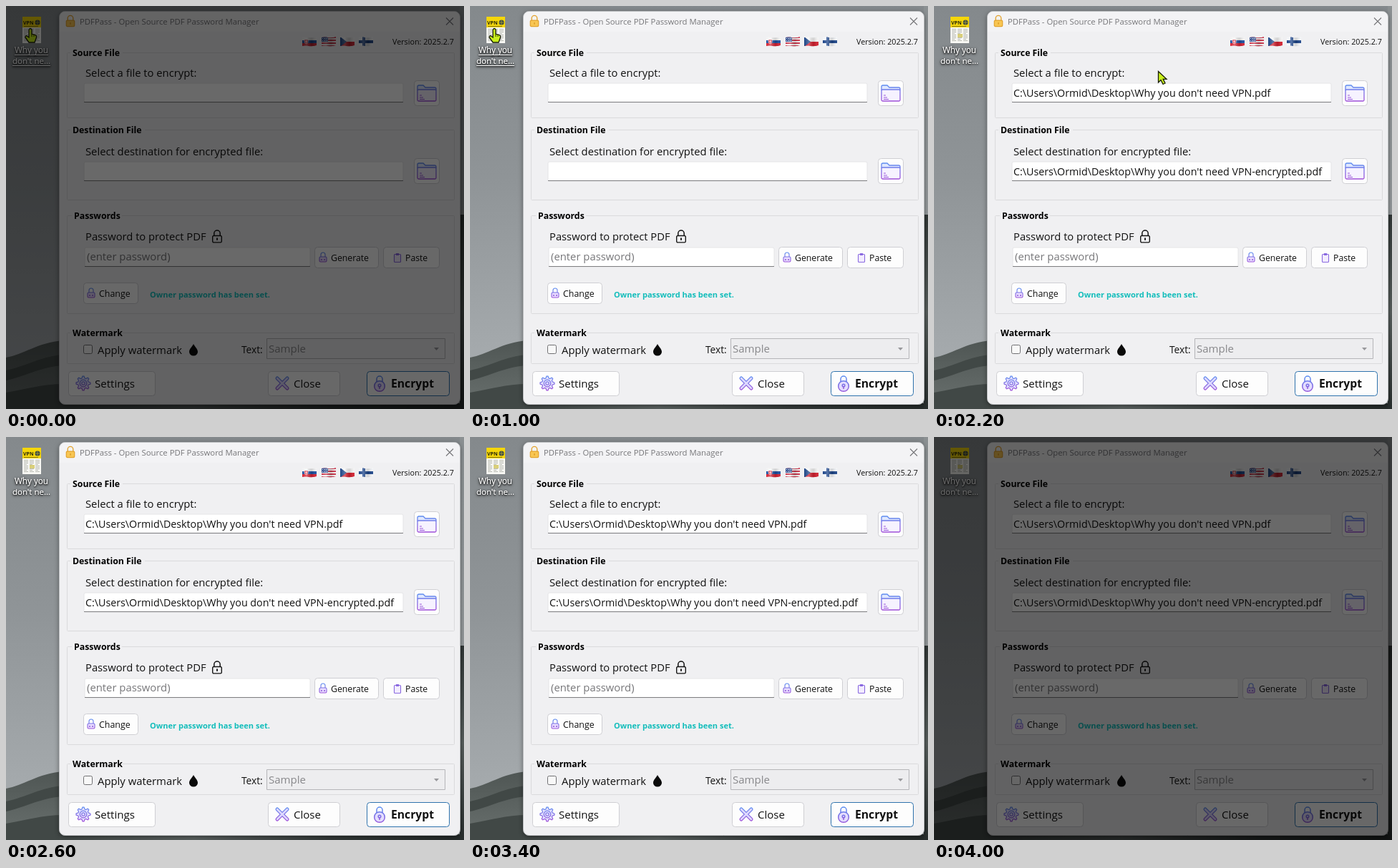
Animation, 640 px wide and 564 px high, one loop 4200 ms. Source, as an HTML page with a canvas:

```html
<!DOCTYPE html>
<html lang="en">
<head>
<meta charset="utf-8">
<title>PDF password dialog</title>
<style>
html, body { margin: 0; width: 100%; height: 100%; overflow: hidden; background: #000; }
canvas { display: block; }
</style>
</head>
<body>
<canvas id="stage" width="640" height="564"></canvas>
<script>
const c = document.getElementById('stage').getContext('2d');
const LOOP = 4200, STEP = 200;
const FONT = '"Open Sans", "Noto Sans", sans-serif';
const SOURCE = "C:\\Users\\Ormid\\Desktop\\Why you don't need VPN.pdf";
const TARGET = SOURCE.replace('.pdf', '-encrypted.pdf');

function text(s, x, y, size, color = '#111', weight = 400, align = 'left') {
  c.font = `${weight} ${size}px ${FONT}`;
  c.textAlign = align;
  c.fillStyle = color;
  c.fillText(s, x, y);
}

function rect(x, y, w, h, color) {
  c.fillStyle = color;
  c.fillRect(x, y, w, h);
}

function box(x, y, w, h, r, fill, stroke, line = 1) {
  c.beginPath();
  c.roundRect(x, y, w, h, r);
  if (fill) { c.fillStyle = fill; c.fill(); }
  if (stroke) { c.strokeStyle = stroke; c.lineWidth = line; c.stroke(); }
}

function path(d, fill, stroke, line = 1) {
  const p = new Path2D(d);
  if (fill) { c.fillStyle = fill; c.fill(p); }
  if (stroke) { c.strokeStyle = stroke; c.lineWidth = line; c.stroke(p); }
}

function fade(x0, y0, x1, y1, ...colors) {
  const g = c.createLinearGradient(x0, y0, x1, y1);
  colors.forEach((k, i) => g.addColorStop(i / (colors.length - 1), k));
  return g;
}

function at(x, y, draw) {
  c.save();
  c.translate(x, y);
  draw();
  c.restore();
}

function desktop() {
  rect(0, 0, 640, 564, fade(0, 0, 0, 480, '#84898c', '#8f9497', '#a4a9ac'));
  path('M0 492C24 488 44 471 80 468V564H0Z', fade(0, 468, 0, 564, '#4f5654', '#5c6361', '#6a716f'));
  path('M0 510C28 504 50 490 80 488V503C48 505 22 520 0 524Z', '#414846');
  path('M0 541C30 536 50 529 80 529V564H0Z', '#414846');
  rect(74, 556, 566, 8, fade(74, 0, 640, 0, '#424947', '#5b6261', '#343a39', '#252b2a'));
  rect(634, 0, 6, 292, fade(0, 0, 0, 292, '#8b9092', '#94999b'));
  rect(634, 292, 6, 272, fade(0, 292, 0, 564, '#303635', '#565d5b', '#272d2c'));
}

function pdfIcon(hover) {
  rect(23, 15, 26, 37, '#f8f8f4');
  rect(23, 15, 26, 15, '#f5d60a');
  text('VPN', 24, 26, 7, '#28280c', 700);
  c.beginPath();
  c.arc(44, 23, 3.6, 0, 7);
  c.fillStyle = '#3d4a45';
  c.fill();
  path('M40 23H48M44 19V27', null, '#b5a92c', .7);
  rect(25, 28, 20, 1, '#88780c');
  for (let i = 0; i < 9; i++)
    for (let k = 0; k < 3; k++) rect(25 + k * 8, 32 + i * 2, i % 4 === 3 ? 4 : 6, 1, '#b9bbb4');
  rect(33, 39, 7, 5, '#d9cf7a');
  c.save();
  c.shadowColor = '#000';
  c.shadowOffsetY = 1;
  for (const blur of [4, 2]) {
    c.shadowBlur = blur;
    text('Why you', 35.5, 66, 11.7, '#fff', 400, 'center');
    text("don't ne...", 35.5, 81, 11.5, '#fff', 400, 'center');
    if (hover) { rect(12, 68, 47, 1, '#fff'); rect(9, 83, 53, 1, '#fff'); }
  }
  c.restore();
}

function padlock(x, y, s, stroke, fill) {
  at(x, y, () => {
    c.scale(s, s);
    path('M-4 -1V-4A4 4 0 0 1 4 -4V-1', null, stroke, 1.4);
    box(-6, -1, 12, 9, 1.5, fill, stroke, 1.3);
    path('M0 2V5', null, stroke, 1.8);
  });
}

function flag(x, draw) {
  at(x, 43, () => {
    c.beginPath();
    c.moveTo(0, 1);
    c.bezierCurveTo(6, -1, 12, 3, 20, 0);
    c.lineTo(20, 12);
    c.bezierCurveTo(12, 15, 6, 11, 0, 13);
    c.closePath();
    c.clip();
    draw();
    rect(0, 0, 20, 14, fade(0, 0, 20, 0, '#fff0', '#fff4', '#0002', '#fff1'));
  });
}

function flags() {
  flag(414, () => {
    rect(0, 0, 20, 5, '#f4f4f4'); rect(0, 5, 20, 4, '#1d4fa0'); rect(0, 9, 20, 5, '#d52232');
    path('M3 4H8V7Q8 9 5.5 10Q3 9 3 7Z', '#d52232', '#fff', .6);
    path('M5.5 5V9M4.3 6.5H6.7', null, '#fff', .8);
  });
  flag(441, () => {
    for (let i = 0; i < 7; i++) rect(0, i * 2, 20, 2, i % 2 ? '#f4eeee' : '#c9344a');
    rect(0, 0, 9, 7, '#34508f');
    for (let i = 0; i < 6; i++) rect(1 + i % 3 * 3, 2 + (i / 3 | 0) * 3, 1, 1, '#dfe5f2');
  });
  flag(467, () => {
    rect(0, 0, 20, 7, '#f5f5f5'); rect(0, 7, 20, 7, '#d3202f');
    path('M0 0L9 7L0 14Z', '#1d4586');
  });
  flag(493, () => {
    rect(0, 0, 20, 14, '#f4f6f9'); rect(5, 0, 4, 14, '#1c4489'); rect(0, 5, 20, 4, '#1c4489');
  });
}

function group(y, h, title, w, x = 93) {
  box(85.5, y + .5, 541, h, 1, null, '#dadadc');
  rect(x - 3, y - 3, w + 6, 7, '#f0f0f2');
  text(title, x, y + 4.5, 12.3, '#000', 700);
}

function field(x, y, w, value) {
  box(x, y, w, 27, 2, '#fff', '#e4e4e6');
  rect(x, y + 26, w, 1, '#7f7f82');
  if (value) text(value, x + 2, y + 19, 14.28, '#111');
}

function button(x, y, w, h, label, tx, size, weight, edge = '#cfcfd3') {
  box(x + .5, y + .5, w - 1, h - 1, 4, '#fdfdfd', edge);
  if (label) text(label, tx, y + h / 2 + size * .37, size, '#111', weight);
}

const violet = (h) => fade(0, -h, 0, h, '#5d8df0', '#a04fd8');

function browse(y) {
  button(570, y, 36, 36);
  at(588, y + 18, () => {
    path('M-13 -4V-9Q-13 -11 -11 -11H-5L-2 -8H11Q13 -8 13 -6V-4', '#dfe8ff', violet(11), 1.3);
    box(-13, -5, 26, 16, 1.5, '#f6f2ff', violet(11), 1.3);
    path('M-10 3H-7M-10 6H-5M-10 8.5H-3', null, '#9a58da', 1);
  });
}

function keyIcon(x, y) {
  at(x, y, () => {
    path('M-3 -1V-4A3 3 0 0 1 3 -4V-1', null, violet(7), 1.1);
    box(-5, -1, 10, 7, 1.5, '#e8dcff', violet(7), 1.1);
    path('M-3 3H-1M1 3H3', null, '#8d55d7', 1.3);
  });
}

function gear() {
  at(108, 528, () => {
    c.strokeStyle = violet(10);
    c.lineWidth = 1.2;
    c.beginPath();
    for (let i = 0; i <= 32; i++) {
      const r = i % 4 < 2 ? 10 : 7.3, a = (i - .5) * Math.PI / 16;
      c.lineTo(Math.cos(a) * r, Math.sin(a) * r);
    }
    c.fillStyle = '#e4e2ff';
    c.fill();
    c.stroke();
    for (const r of [4.8, 2.2]) { c.beginPath(); c.arc(0, 0, r, 0, 7); c.stroke(); }
  });
}

function dialog(filled) {
  c.save();
  c.shadowColor = '#0007';
  c.shadowBlur = 7;
  c.shadowOffsetY = 2;
  box(74.5, 7.5, 560, 550, 8, '#f0f0f2');
  c.restore();
  box(74.5, 7.5, 560, 550, 8, null, '#c2c4c6');
  box(75, 8, 559, 28, [8, 8, 0, 0], '#f3f3f5');
  padlock(90, 21, .95, '#e2a22c', '#f8c653');
  text('PDFPass - Open Source PDF Password Manager', 103, 26, 11.35, '#77777a');
  path('M615 16.5L625 26.5M625 16.5L615 26.5', null, '#77777a', 1.1);
  flags();
  text('Version: 2025.2.7', 540, 54, 10.75);

  group(65, 91, 'Source File', 67);
  text('Select a file to encrypt:', 111, 99, 14.8);
  field(109, 108, 446, filled && SOURCE);
  browse(104);

  group(173, 98, 'Destination File', 98);
  text('Select destination for encrypted file:', 111, 209, 14.8);
  field(109, 218, 446, filled && TARGET);
  browse(213);

  group(293, 137, 'Passwords', 64, 95);
  text('Password to protect PDF', 111, 328, 14.75);
  padlock(295, 322.5, 1.05, '#111');
  field(110, 338, 315);
  text('(enter password)', 113, 356, 14.85, '#77777a');
  button(431, 337, 90, 30, 'Generate', 454, 12.25);
  keyIcon(443, 352);
  button(527, 337, 79, 30, 'Paste', 558, 12.25);
  box(542.5, 347.5, 9, 11, 1, '#f3edff', '#8a6ae0', 1.1);
  rect(545, 346, 4, 3, '#8a6ae0');
  button(108, 387, 77, 30, 'Change', 130, 12.4);
  keyIcon(119, 402);
  text('Owner password has been set.', 201, 408, 11.05, '#13bdbb', 700);

  group(457, 43, 'Watermark', 67);
  box(108.5, 474.5, 12, 12, 2, '#f8f8f8', '#707072');
  text('Apply watermark', 128, 487, 14.85);
  path('M262 473C264 477 268 480 268 484A6 5.5 0 0 1 256 484C256 480 260 477 262 473Z', '#0a0a0a');
  text('Text:', 329, 486, 13.7);
  box(364.5, 465.5, 249, 28, 0, '#ededef', '#b5b5b8');
  text('Sample', 367, 485, 15, '#88888b');
  path('M598 478H605L601.5 482Z', '#98989b');

  button(87, 511, 122, 35, 'Settings', 124, 15.1);
  gear();
  button(366, 511, 101, 35, 'Close', 402, 15);
  at(386, 528, () => {
    c.lineCap = 'round';
    path('M-7 -7L7 7M7 -7L-7 7', null, violet(9), 5);
    path('M-7 -7L7 7M7 -7L-7 7', null, '#ddd9ff', 2.6);
  });
  button(504, 511, 116, 35, 'Encrypt', 538, 15.7, 700, '#2f73ad');
  at(522, 531, () => {
    path('M-4 -5V-9A4 4 0 0 1 4 -9V-5', null, violet(12), 1.5);
    c.beginPath();
    c.arc(0, 1, 7.3, 0, 7);
    c.fillStyle = '#e4ddff';
    c.fill();
    c.stroke();
    c.beginPath();
    c.arc(0, 0, 1.8, 0, 7);
    c.stroke();
    path('M0 2V5', null, '#8d55d7', 1.4);
  });
}

const ARROW = 'M.5 .5V16L4 12.5L7 18.5L10 17L7.2 11.3H12Z';

const cursors = {
  hand() {
    path('M-2 8V1Q0 -2 2 1V7L7 8.5Q9 9.5 8.5 12L6 19H-2L-7 12Q-7 9 -4.5 10L-2 12Z', '#c9f01c', '#161a06', 1.3);
    path('M2 7V11M5 8V11', null, '#161a06', .9);
  },
  deny() {
    for (const [color, w] of [['#fff', 5], ['#111', 2.8]]) {
      c.strokeStyle = color;
      c.lineWidth = w;
      c.beginPath();
      c.arc(0, 0, 9, 0, 7);
      c.moveTo(-6.4, -6.4);
      c.lineTo(6.4, 6.4);
      c.stroke();
    }
  },
  drag() {
    path(ARROW, '#fff', '#111', 1.1);
    c.setLineDash([1.5, 1.5]);
    box(4.5, 15.5, 9, 9, 0, null, '#222');
    c.setLineDash([]);
    box(9.5, 19.5, 8, 8, 0, '#fff', '#111');
    path('M11 23.5H16M13.5 21V26', null, '#111', 1.2);
  },
  arrow() { path(ARROW, '#c9f01c', '#161a06', 1.3); }
};

// [start ms, shape, x, y]
const moves = [
  [0, 'hand', 34, 32],
  [1200, 'deny', 148, 54],
  [1400, 'drag', 251, 58],
  [1600, 'drag', 308, 86],
  [1800, 'drag', 313, 91],
  [2200, 'arrow', 313, 91],
  [2600]
];

function draw(t) {
  desktop();
  pdfIcon(t < 1200);
  dialog(t >= 2200);
  const [, shape, x, y] = moves.findLast(m => m[0] <= t);
  if (shape) at(x, y, cursors[shape]);
  if (t < 200 || t >= 4000) rect(0, 0, 640, 564, 'rgba(0,0,0,.59)');
}

const start = performance.now();
let shown = -1;

function tick() {
  const t = Math.floor((performance.now() - start) % LOOP / STEP) * STEP;
  if (t !== shown) draw(shown = t);
  requestAnimationFrame(tick);
}
tick();
</script>
</body>
</html>
```
